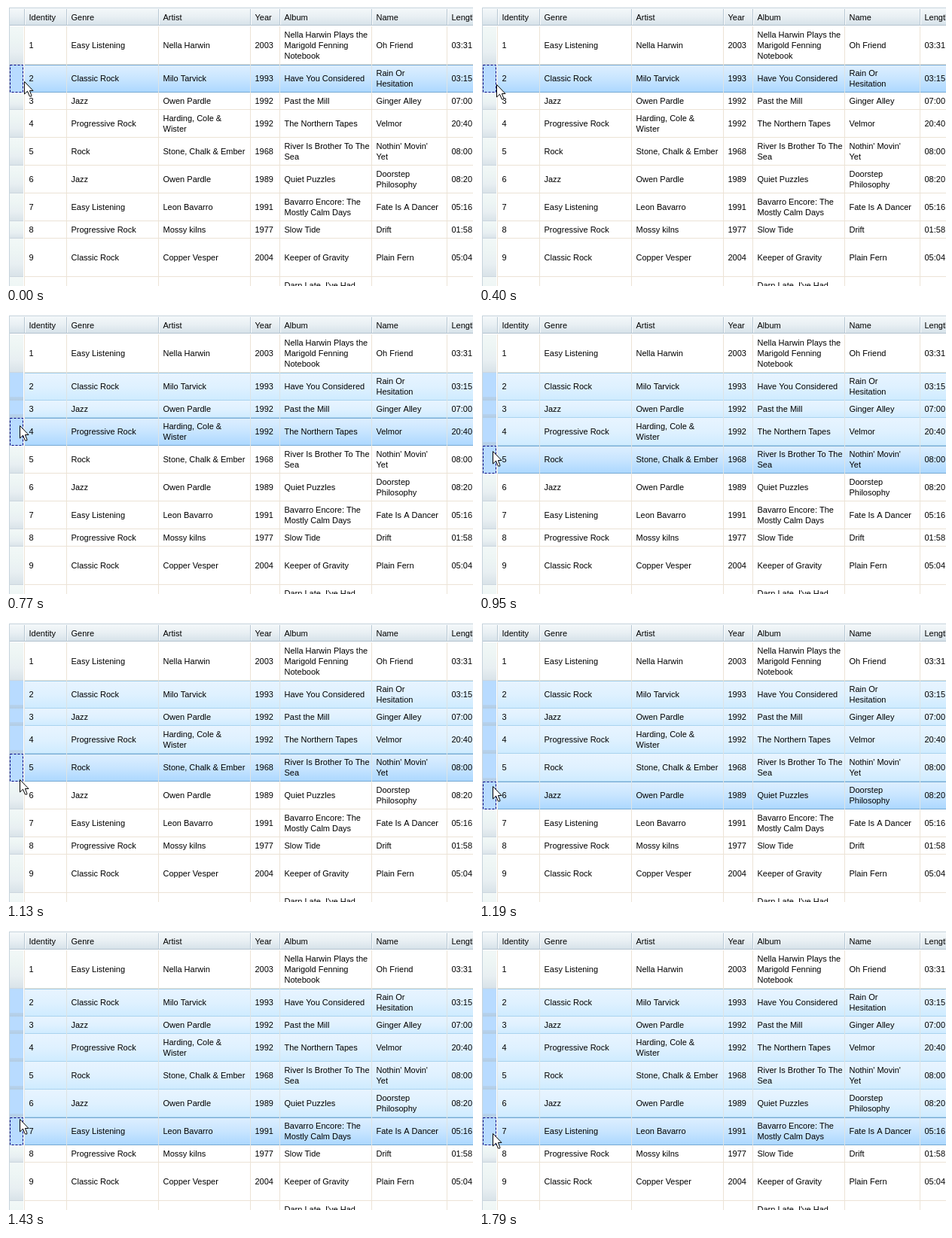
Write an HTML page with a canvas that moves like this. It is 620 by 372 pixels and loops after 3850 ms.

```html
<!DOCTYPE html>
<html>
<head>
<meta charset="utf-8">
<style>
html, body { margin: 0; width: 100%; height: 100%; overflow: hidden; background: #fff; }
canvas { display: block; }
</style>
</head>
<body>
<canvas id="stage" width="620" height="372"></canvas>
<script>
const ctx = document.getElementById('stage').getContext('2d');
const W = 620, LOOP = 3850, LEFT = 5, BODY = 25, PAD = 6.5;
const cols = [24, 80, 202, 324, 363, 485, 585];
const titles = ['Identity', 'Genre', 'Artist', 'Year', 'Album', 'Name', 'Length'];

// Cells are separated by | and lines within a cell by /
const rows = [
  [3, '1|Easy Listening|Nella Harwin|2003|Nella Harwin Plays the/Marigold Fenning/Notebook|Oh Friend|03:31'],
  [2, '2|Classic Rock|Milo Tarvick|1993|Have You Considered|Rain Or/Hesitation|03:15'],
  [1, '3|Jazz|Owen Pardle|1992|Past the Mill|Ginger Alley|07:00'],
  [2, '4|Progressive Rock|Harding, Cole &/Wister|1992|The Northern Tapes|Velmor|20:40'],
  [2, '5|Rock|Stone, Chalk & Ember|1968|River Is Brother To The/Sea|Nothin\' Movin\'/Yet|08:00'],
  [2, '6|Jazz|Owen Pardle|1989|Quiet Puzzles|Doorstep/Philosophy|08:20'],
  [2, '7|Easy Listening|Leon Bavarro|1991|Bavarro Encore: The/Mostly Calm Days|Fate Is A Dancer|05:16'],
  [1, '8|Progressive Rock|Mossy kilns|1977|Slow Tide|Drift|01:58'],
  [3, '9|Classic Rock|Copper Vesper|2004|Keeper of Gravity|Plain Fern|05:04'],
  [3, '||||Darn Late, I\'ve Had/ / ||']
].map(([lines, text]) => ({
  lines, h: lines * 14 + 9, cells: text.split('|').map(c => c.split('/'))
}));
rows.reduce((y, row) => (row.y = y) + row.h, 27);

// Pointer path: time, x, y
const path = [
  [340, 24, 100], [590, 18, 118], [770, 18, 148], [890, 18, 164], [950, 18, 182],
  [1190, 18, 218], [1430, 18, 251], [1790, 18, 270]
];

function pointerAt(t) {
  const q = t < 400 ? 0 : t < 470 ? 400 : 470 + 60 * Math.floor((t - 470) / 60);
  const i = path.findIndex(p => p[0] >= q);
  if (i < 0) return path[path.length - 1].slice(1);
  if (i === 0) return path[0].slice(1);
  const a = path[i - 1], b = path[i], k = (q - a[0]) / (b[0] - a[0]);
  return [1, 2].map(n => Math.round(a[n] + (b[n] - a[n]) * k));
}

function box(x, y, w, h, color) {
  ctx.fillStyle = color;
  ctx.fillRect(x, y, w, h);
}

function fade(x, y, w, h, ...stops) {
  const g = ctx.createLinearGradient(0, y, 0, y + h);
  stops.forEach((c, i) => g.addColorStop(i / (stops.length - 1), c));
  box(x, y, w, h, g);
}

function drawHeader() {
  box(4, 2, W, 1, '#c6d3dc');
  fade(LEFT, 3, W, 23, '#f4f8fa', '#e8eff3', '#d5e1e9');
  box(LEFT, 25, W, 1, '#b4c4d0');
  cols.forEach((x, i) => {
    box(x, 4, 1, 21, '#b9c8d3');
    box(x + 1, 4, 1, 21, '#fafcfd');
    ctx.fillStyle = '#000';
    ctx.fillText(titles[i], x + PAD, 19);
  });
}

function drawFocus({ y, h }) {
  ctx.setLineDash([3, 2]);
  ctx.strokeStyle = '#000080';
  ctx.strokeRect(LEFT + .5, y + .5, 17, h - 1);
}

function drawRow(row, i, current) {
  const { y, h } = row, on = i > 0 && i <= current, now = i === current;
  if (on) {
    box(LEFT, y, 18, h, '#b8dbff');
    if (!now) fade(LEFT, y + h - 5, 18, 5, '#b6d2ee', '#b3cce2');
    fade(BODY, y, W, h, ...(now ? ['#deefff', '#c8e5ff', '#abd7ff'] : ['#e8f4ff', '#dff1ff', '#ceebff']));
  } else {
    fade(LEFT, y, 18, h, '#f2f8f7', '#edf5f4', '#e8eff2', '#d8e2e8');
    box(LEFT, y + h - 1, 18, 1, '#ccd6de');
  }
  box(BODY, y + h - 1, W, 1, now ? '#76a9d2' : on ? '#a9d3ef' : '#ece3d6');
  if (now) box(BODY, y, W, 1, '#76a9d2');
  else if (i === 1) box(BODY, y, W, 1, '#a0cce9');
  cols.forEach(x => box(x, y, 1, h, on ? '#dde3e4' : '#ece3d6'));

  ctx.fillStyle = '#000';
  row.cells.forEach((lines, c) => {
    const base = y + 15 + (row.lines - lines.length) * 7;
    lines.forEach((s, n) => ctx.fillText(s, cols[c] + PAD, base + n * 14));
  });
  if (now) drawFocus(row);
}

const arrow = new Path2D('M.5 .5V17L4.5 13.2L7.4 20H9.8V18.5L7.4 12.5H12Z');

function drawPointer(x, y) {
  ctx.setLineDash([]);
  ctx.save();
  ctx.translate(x, y);
  ctx.fillStyle = '#fff';
  ctx.strokeStyle = '#000';
  ctx.fill(arrow);
  ctx.stroke(arrow);
  ctx.restore();
}

function frame(now) {
  const [x, y] = pointerAt(now % LOOP);
  const current = rows.findIndex(r => y < r.y + r.h);
  ctx.font = '11px "Liberation Sans", Arial, sans-serif';
  ctx.lineWidth = 1;
  box(0, 0, W, 372, '#fff');
  box(4, 2, 1, 370, '#c6d3dc');
  drawHeader();
  rows.forEach((row, i) => drawRow(row, i, current));
  drawPointer(x, y);
}

const start = performance.now();
function tick() {
  frame(performance.now() - start);
  requestAnimationFrame(tick);
}
tick();
</script>
</body>
</html>
```
